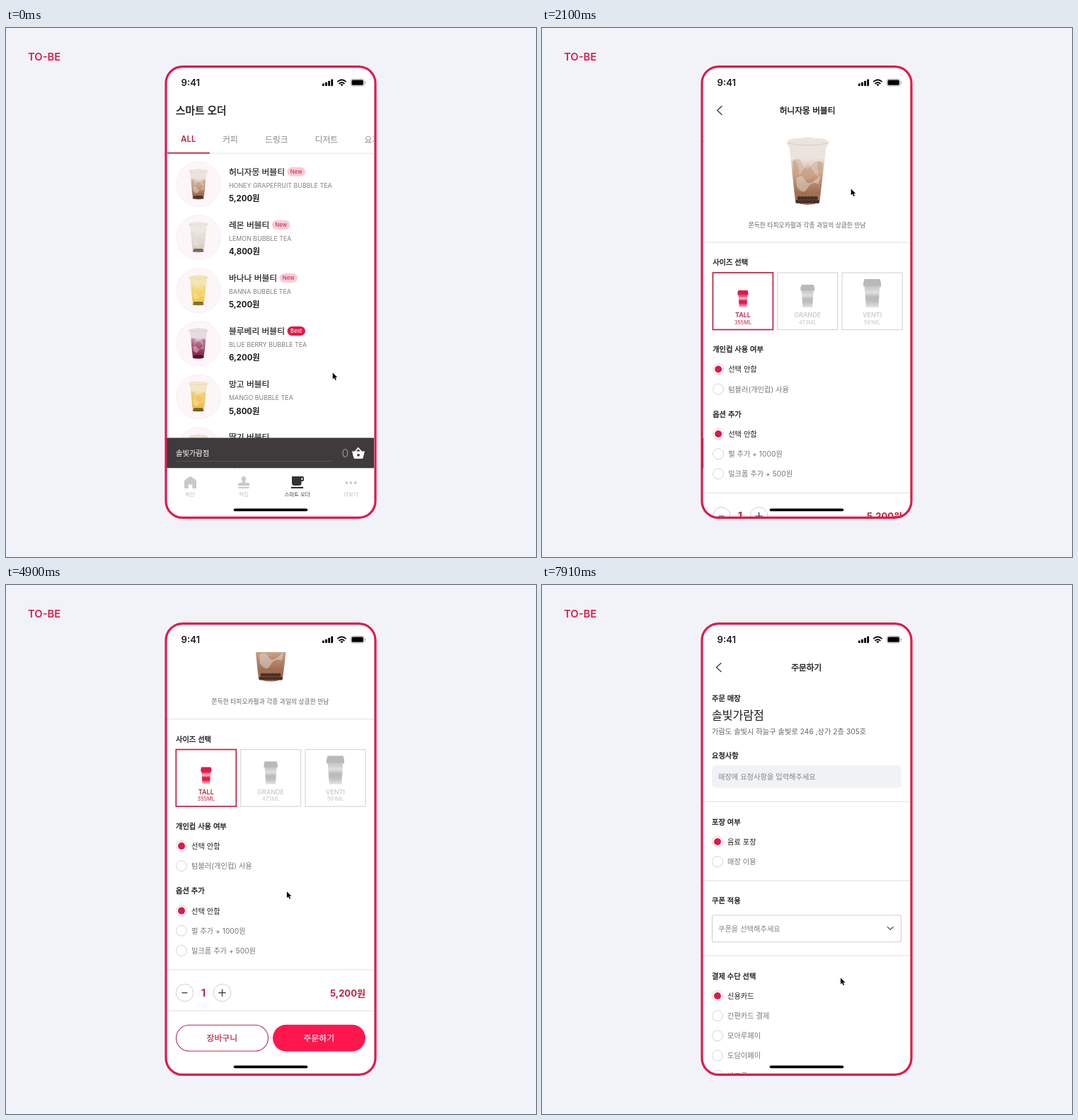
Recreate the animation shown at these times as an HTML page. Size 749 by 748 pixels, loop 8000 ms.

```html
<!DOCTYPE html>
<html lang="ko">
<head>
<meta charset="utf-8">
<title>Smart order</title>
<style>
  html, body { margin: 0; width: 100%; height: 100%; overflow: hidden; background: #f1f3f8; }
  svg { display: block; width: 100vw; height: 100vh; }
  text { font-family: Inter, "Noto Sans CJK KR", "Noto Sans CJK", sans-serif; white-space: pre; }
</style>
</head>
<body>
<svg id="stage" viewBox="0 0 749 748"></svg>
<script>
const RED = '#e0194a', DEEP = '#c0213f', HOT = '#ff164d', INK = '#1c1c1e', GRAY = '#808080', RULE = '#e4e4e6';
const LEFT = 227, WIDTH = 293;

// Text is placed by its vertical centre. Hangul is set slightly smaller than Latin,
// and its medium weights are drawn as regular with a thin outline.
function text(str, x, cy, size, { fill = INK, weight = 400, anchor = 'start' } = {}) {
  const hangul = /[가-힣]/.test(str);
  const fontSize = hangul ? size * 0.94 : size;
  const outlined = hangul && weight < 700;
  const outline = outlined ? `stroke="${fill}" stroke-width="${((weight - 400) * 0.00017 * fontSize).toFixed(2)}"` : '';
  return `<text x="${x}" y="${(cy + size * 0.36).toFixed(2)}" font-size="${fontSize.toFixed(2)}" font-weight="${outlined ? 400 : weight}" fill="${fill}" ${outline} text-anchor="${anchor}">${str}</text>`;
}
const rect = (x, y, w, h, attrs) => `<rect x="${x}" y="${y}" width="${w}" height="${h}" ${attrs}/>`;
const path = (d, attrs) => `<path d="${d}" ${attrs}/>`;
const band = (y, h, fill) => rect(LEFT, y, WIDTH + 1, h, `fill="${fill}"`);
const rule = (y, fill = RULE) => band(y - 0.6, 1.2, fill);
const line = (d, color, width) => path(d, `fill="none" stroke="${color}" stroke-width="${width}" stroke-linecap="round" stroke-linejoin="round"`);
const heading = (str, cy) => text(str, 240, cy, 10.9, { weight: 600 });
const back = () => line('M253 110.5L246.5 116.5L253 122.5', '#333', 1.2);
const paper = () => band(55, 640, '#fff');

function radio(label, cy, on) {
  return `<circle cx="248" cy="${cy}" r="7.5" fill="#fff" stroke="#d4d4d8"/>` +
    (on ? `<circle cx="248" cy="${cy}" r="5" fill="${RED}"/>` : '') +
    text(label, 262, cy, 10.9, { fill: on ? INK : '#777' });
}

function gradient(id, stops) {
  return `<linearGradient id="${id}" x2="0" y2="1">` +
    stops.map(([at, color]) => `<stop offset="${at}" stop-color="${color}"/>`).join('') + '</linearGradient>';
}

const flavours = [
  ['honey', '#ece4dc', '#c9a288', '#a06f55', '#35211d'],
  ['lemon', '#ebe7e1', '#e3dcd3', '#d8cfc4', '#4d423c'],
  ['banana', '#f3e6b4', '#f3d568', '#efca4c', '#54421f'],
  ['berry', '#e6dbe1', '#b05f80', '#8a2f52', '#2e1222'],
  ['mango', '#f4e6c6', '#f2c75c', '#eebd4e', '#47371b'],
  ['straw', '#efe0cf', '#e8b3a8', '#d98585', '#4a2426']
];

function cup(x, y, scale, [id, top, mid, , pearl]) {
  const pearls = Array.from({ length: 13 }, (_, i) =>
    `<circle cx="${16 + (i % 7) * 4.7 + (i > 6 ? 2.3 : 0)}" cy="${i > 6 ? 86 : 91}" r="2.7" fill="${pearl}" opacity=".8"/>`).join('');
  return `<g transform="translate(${x} ${y}) scale(${scale})">` +
    path('M4 10H57L47 92Q30 99 13 92Z', `fill="url(#${id})"`) +
    path('M1 6Q8 0 18 2Q30 -2 42 2Q54 0 60 6L58 13Q30 18 3 13Z', `fill="${top}"`) +
    line('M1 8Q30 15 60 8', '#cfc8c0', 0.8) +
    path('M9 34Q18 26 23 38T35 40Q44 30 52 37L50 48Q42 42 37 53T24 58Q16 46 11 52Z', `fill="${mid}" opacity=".7"`) +
    path('M14 58Q22 51 27 61T48 54L46 66Q36 61 30 72T15 70Z', `fill="${top}" opacity=".45"`) +
    path('M10 30Q20 40 18 54Q26 44 30 34Q36 48 46 56Q42 40 46 28Z', `fill="${top}" opacity=".35"`) +
    pearls + '</g>';
}

function sizeBox(x, name, volume, w, h, on) {
  const cx = x + 42.5, top = 395 - h, lid = h * 0.27, half = w / 2;
  const color = on ? DEEP : '#c6c6c8';
  const label = { fill: color, anchor: 'middle' };
  return rect(x, 346, 85, 80.5, `fill="#fff" stroke="${on ? DEEP : '#dadadc'}" stroke-width="${on ? 1.7 : 1.3}"`) +
    path(`M${cx - half * 0.86} ${top + lid}H${cx + half * 0.86}L${cx + half * 0.7} 395H${cx - half * 0.7}Z`, `fill="url(#${on ? 'redCup' : 'grayCup'})"`) +
    path(`M${cx - half * 0.88} ${top}H${cx + half * 0.88}L${cx + half} ${top + lid * 0.5}V${top + lid}H${cx - half}V${top + lid * 0.5}Z`, `fill="${on ? RED : '#b9b9ba'}"`) +
    text(name, cx, 405.7, 9, { ...label, weight: on ? 600 : 500 }) +
    text(volume, cx, 416.2, 7.5, label);
}

const items = [
  ['허니자몽 버블티', 'HONEY GRAPEFRUIT BUBBLE TEA', '5,200원', 'New', 397.5],
  ['레몬 버블티', 'LEMON BUBBLE TEA', '4,800원', 'New', 376],
  ['바나나 버블티', 'BANNA BUBBLE TEA', '5,200원', 'New', 386.5],
  ['블루베리 버블티', 'BLUE BERRY BUBBLE TEA', '6,200원', 'Best', 397.5],
  ['망고 버블티', 'MANGO BUBBLE TEA', '5,800원'],
  ['딸기 버블티', 'STRAWBERRY BUBBLE TEA', '5,800원']
];

function item([name, english, price, badge, badgeX], i) {
  const y = i * 75.1;
  const best = badge === 'Best';
  return `<circle cx="272.3" cy="${221 + y}" r="31.5" fill="#fdf6f9" stroke="#f6e9ee" stroke-width=".8"/>` +
    cup(258, 199 + y, 0.455, flavours[i]) +
    text(name, 315, 203 + y, 12.5, { weight: 500 }) +
    (badge ? rect(badgeX, 196.7 + y, 25.5, 13, `rx="6.5" fill="${best ? RED : '#fbccd7'}"`) +
      text(badge, badgeX + 12.7, 203.3 + y, 7.8, { fill: best ? '#fff' : DEEP, anchor: 'middle' }) : '') +
    text(english, 315, 222.3 + y, 8.9, { fill: GRAY }) +
    text(price, 315, 240.8 + y, 12.1, { weight: 700 });
}

function listPage() {
  const tabs = [['커피', 306], ['드링크', 366], ['디저트', 436.5], ['요거트', 506.5]];
  const labels = [['메인', 260], ['적립', 335.7], ['스마트 오더', 411.5], ['더보기', 487.3]];
  const pale = 'fill="#c9c9ce"', dark = 'fill="#333"';
  return paper() + text('스마트 오더', 240, 116.3, 15.6, { weight: 600 }) +
    text('ALL', 247, 157.3, 11.6, { fill: DEEP, weight: 600 }) +
    tabs.map(([name, x]) => text(name, x, 157.3, 12.6, { fill: '#8a8a8c' })).join('') +
    rule(177.2, '#e9e9eb') + rect(228, 175.9, 60, 1.7, 'fill="#b5223f"') +
    items.map(item).join('') +
    band(579.5, 43, '#3f3a3b') +
    text('솔빛가람점', 240, 601, 10.9, { fill: '#fff' }) +
    rect(240, 612, 221, 1, 'fill="#575253"') +
    text('0', 474.5, 601, 15.5, { fill: '#918c8d' }) +
    line('M493 599.5L497.8 593.8L502.6 599.5', '#fff', 1.7) +
    path('M489 598.5H507L504.5 608Q504.2 609 503 609H493Q491.8 609 491.5 608Z', 'fill="#fff"') +
    '<circle cx="498" cy="603.8" r="1.9" fill="#3f3a3b"/>' +
    band(622.5, 72, '#fff') +
    path('M252 641Q252 639.6 253 638.8L259 634.6Q260.4 633.7 261.8 634.6L268 638.8Q269 639.6 269 641V651H263.3V645.5H257.7V651H252Z', pale) +
    path('M333.5 643Q335 641 332.8 638.5A3.4 3.4 0 1 1 339.2 638.5Q337 641 338.5 643H342Q344.2 643 344.2 645V647.3H327.8V645Q327.8 643 330 643Z', pale) +
    rect(328.5, 648.8, 15, 2.2, pale) +
    path('M404 634H419Q421 634 421 636V639Q421 641 419 641H417.5V643.5Q417.5 647 414 647H407.5Q404 647 404 643.5ZM417.5 636V639H419.2V636Z', dark + ' fill-rule="evenodd"') +
    rect(403, 648.8, 17, 2.2, dark) +
    [481.3, 487.5, 493.7].map(x => `<circle cx="${x}" cy="643" r="1.9" ${pale}/>`).join('') +
    labels.map(([name, x], i) => text(name, x, 659, 7.8, { fill: i === 2 ? '#333' : '#bdbdc2', anchor: 'middle' })).join('');
}

function stepper(cx, d) {
  return `<circle cx="${cx}" cy="690" r="12.3" fill="#fff" stroke="#cfcfd3"/>` + line(d, '#333', 1.2);
}

function detailPage() {
  const mid = { anchor: 'middle' };
  return paper() + '<g id="sheet">' + back() +
    text('허니자몽 버블티', 374, 116.3, 12.5, { ...mid, weight: 600 }) +
    cup(344, 154.5, 1, flavours[0]) +
    text('쫀득한 타피오카펄과 각종 과일의 상큼한 만남', 373.5, 278.3, 9.35, { ...mid, fill: '#666' }) +
    rule(303) + heading('사이즈 선택', 331.5) +
    sizeBox(240.3, 'TALL', '355ML', 15, 24, true) +
    sizeBox(331.6, 'GRANDE', '473ML', 19.5, 32) +
    sizeBox(423, 'VENTI', '591ML', 25, 40) +
    heading('개인컵 사용 여부', 454.3) + radio('선택 안함', 482.5, true) + radio('텀블러(개인컵) 사용', 510.6) +
    heading('옵션 추가', 545.8) + radio('선택 안함', 574, true) +
    radio('펄 추가 + 1000원', 602.2) + radio('밀크폼 추가 + 500원', 630.4) +
    rule(657.4) +
    stepper(252.5, 'M249 690H256') + stepper(305.5, 'M300.7 690H310.3M305.5 685.2V694.8') +
    text('1', 279, 690, 14, { ...mid, fill: DEEP, weight: 700 }) +
    text('5,200원', 508, 690, 13.9, { fill: DEEP, weight: 700, anchor: 'end' }) +
    rule(715.4) +
    rect(240.5, 735.7, 130, 36.7, `rx="18.3" fill="#fff" stroke="#b92a4a" stroke-width="1.1"`) +
    rect(377, 735.2, 131, 37.6, `rx="18.8" fill="${HOT}"`) +
    text('장바구니', 305.3, 753.7, 12.6, { ...mid, fill: DEEP, weight: 500 }) +
    text('주문하기', 442.3, 753.7, 12.6, { ...mid, fill: '#fff', weight: 500 }) + '</g>';
}

function orderPage() {
  const hint = { fill: '#858587' };
  return paper() + back() + text('주문하기', 373.8, 116.3, 12.5, { weight: 600, anchor: 'middle' }) +
    heading('주문 매장', 159.7) + text('솔빛가람점', 240, 184, 17.1) +
    text('가람도 솔빛시 하늘구 솔빛로 246 ,상가 2층 305호', 240, 207.3, 10.9, { fill: '#666' }) +
    heading('요청사항', 240.7) + rect(240, 255, 268, 31.7, 'rx="5" fill="#f1f2f6"') +
    text('매장에 요청사항을 입력해주세요', 249, 271, 10.9, hint) +
    rule(306.2) + heading('포장 여부', 334.7) + radio('음료 포장', 363, true) + radio('매장 이용', 391.2) +
    rule(418) + heading('쿠폰 적용', 446.5) +
    rect(240.5, 467, 267, 37.7, 'rx="2" fill="#fff" stroke="#cfcfd3" stroke-width="1.1"') +
    text('쿠폰을 선택해주세요', 249, 486, 10.9, hint) + line('M488.2 483.4L492.3 487.4L496.4 483.4', '#444', 1.2) +
    rule(524.2) + heading('결제 수단 선택', 552.7) +
    ['신용카드', '간편카드 결제', '모아루페이', '도담이페이', '바로콩'].map((name, i) => radio(name, 581 + i * 28.15, i === 0)).join('');
}

function statusBar() {
  const bars = [3.4, 5.2, 7.2, 9.6].map((h, i) => rect(447 + i * 4.1, 82 - h, 2.8, h, 'rx=".7"')).join('');
  const arc = (r, y) => line(`M${474.5 - r} ${y}Q474.5 ${y - r * 0.85} ${474.5 + r} ${y}`, '#000', 1.9);
  return band(55, 40, '#fff') + text('9:41', 247.6, 77.4, 13.2, { weight: 600 }) + bars +
    arc(5.6, 75.6) + arc(3.3, 78.4) + path('M472.4 80L474.5 82.2L476.6 80Q474.5 78.4 472.4 80Z', '') +
    rect(487.4, 72.4, 18.6, 9.6, 'rx="2.6" fill="none" stroke="#999" stroke-width=".8"') +
    rect(488.6, 73.6, 16.2, 7.2, 'rx="1.5"') + rect(507, 75.7, 1, 3, 'rx=".5" fill="#999"');
}

const stage = document.getElementById('stage');
stage.innerHTML = '<defs>' +
  flavours.map(([id, top, mid, low]) => gradient(id, [[0, top], [0.22, top], [0.5, mid], [0.8, low], [1, low]])).join('') +
  gradient('redCup', [[0, RED], [0.28, '#f9bfcc'], [0.48, RED], [0.65, RED], [1, '#f8ccd6']]) +
  gradient('grayCup', [[0, '#c6c6c7'], [0.28, '#dfdfe0'], [0.5, '#bababb'], [0.7, '#bebebf'], [1, '#e2e2e3']]) +
  `<clipPath id="screen">${rect(LEFT, 55, 294, 637, 'rx="23"')}</clipPath></defs>` +
  rect(0, 0, 749, 748, 'fill="#f1f3f8"') + text('TO-BE', 31, 41, 14.8, { fill: '#d81f4c', weight: 600 }) +
  '<g clip-path="url(#screen)">' + rect(LEFT, 55, 294, 637, 'fill="#fff"') +
  `<g id="list">${listPage()}</g><g id="detail">${detailPage()}</g><g id="order">${orderPage()}</g>` +
  statusBar() + rect(321.7, 679.4, 104.6, 3.8, 'rx="1.9"') + '</g>' +
  rect(226, 54.6, 296, 637.8, `rx="23.5" fill="none" stroke="${RED}" stroke-width="3.2"`) +
  '<g id="cursor"><circle id="press" r="16" fill="#000" opacity=".15"/>' +
  path('M0 0V10.2L2.4 8L4.2 12L5.9 11.2L4.2 7.4H7.3Z', 'transform="translate(.7 .5) scale(.88)" stroke="#fff" stroke-width=".8" paint-order="stroke"') + '</g>';

const [list, detail, sheet, order, cursor, press] =
  ['list', 'detail', 'sheet', 'order', 'cursor', 'press'].map(id => document.getElementById(id));

const LOOP = 8000, STEP = 70, LAST = 7910;
const cursorPath = [
  [350, 461, 487], [1190, 435.7, 228], [1260, 436, 227],
  [2730, 436, 227], [3360, 397.7, 413],
  [4760, 397.7, 413], [4970, 395.7, 440], [5600, 426, 629],
  [5670, 422, 627.5], [5740, 424, 637], [5810, 429, 637], [5880, 427.7, 635],
  [7420, 427.7, 635], [7910, 421.3, 555]
];
const scrollSteps = [[3780, 14], [3850, 52], [3920, 84], [3990, 96], [4130, 113.4]];
const presses = [[1610, 1680], [6300, 6440]];

const smooth = u => u * u * (3 - 2 * u);

function cursorAt(t) {
  const next = cursorPath.findIndex(([time]) => time > t);
  if (next === 0) return cursorPath[0].slice(1);
  if (next < 0) return cursorPath[cursorPath.length - 1].slice(1);
  const [t0, x0, y0] = cursorPath[next - 1], [t1, x1, y1] = cursorPath[next];
  const u = smooth((t - t0) / (t1 - t0));
  return [x0 + (x1 - x0) * u, y0 + (y1 - y0) * u];
}

// cubic-bezier(0, 0, .58, 1) over 300 ms
function push(t, start) {
  const u = Math.min(1, Math.max(0, (t - start) / 300));
  if (u === 0 || u === 1) return u;
  let low = 0, high = 1;
  for (let i = 0; i < 20; i++) {
    const s = (low + high) / 2;
    if (1.74 * (1 - s) * s * s + s ** 3 < u) low = s; else high = s;
  }
  return 3 * (1 - low) * low * low + low ** 3;
}

const move = (node, x, y) => node.setAttribute('transform', `translate(${x.toFixed(2)} ${y.toFixed(2)})`);

function draw(elapsed) {
  const t = Math.min(LAST, Math.floor((elapsed % LOOP) / STEP) * STEP);
  const first = push(t, 1814), second = push(t, 6573);
  move(list, -first * WIDTH, 0);
  move(detail, (1 - first - second) * WIDTH, 0);
  move(order, (1 - second) * WIDTH, 0);
  move(sheet, 0, -scrollSteps.reduce((y, [time, value]) => t >= time ? value : y, 0));
  move(cursor, ...cursorAt(t));
  press.style.display = presses.some(([from, to]) => t >= from && t < to) ? '' : 'none';
}

const start = performance.now();
function tick() {
  draw(performance.now() - start);
  requestAnimationFrame(tick);
}
tick();
</script>
</body>
</html>
```
